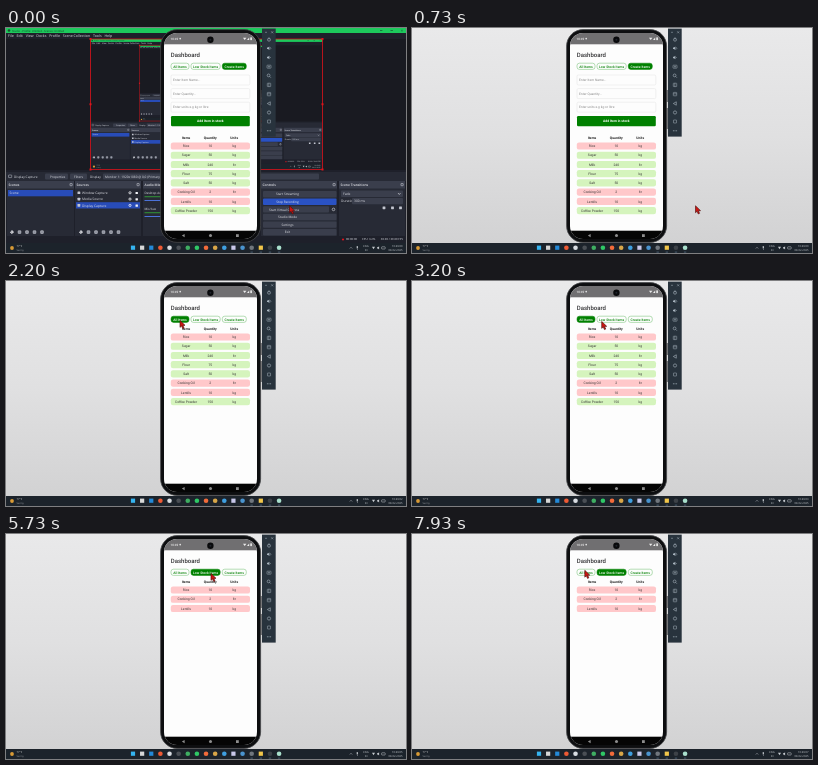
An HTML page with a canvas for the animation above (8000 ms loop, 400x225 px).

```html
<!DOCTYPE html>
<html lang="en">
<head>
<meta charset="utf-8">
<title>Stock dashboard</title>
<style>
html, body { margin: 0; width: 100%; height: 100%; overflow: hidden; background: #ddd; }
canvas { display: block; width: 100vw; height: 100vh; }
</style>
</head>
<body>
<canvas id="stage"></canvas>
<script>
const W = 400, H = 225, LOOP = 8000;
const canvas = document.getElementById('stage');
const ctx = canvas.getContext('2d');
const GREEN = '#008000', PINK = '#ffc8ca', LIME = '#d5f4bd';
const PREVIEW = { x: 84.5, y: 11, scale: 0.58 };

// Stock below 20 counts as low.
const items = [
  ['Rice', 10, 'kg'], ['Sugar', 50, 'kg'], ['Milk', 240, 'ltr'], ['Flour', 75, 'kg'],
  ['Salt', 50, 'kg'], ['Cooking Oil', 2, 'ltr'], ['Lentils', 10, 'kg'], ['Coffee Powder', 150, 'kg']
];
const isLow = item => item[1] < 20;

// Pointer tip: time, x, y
const path = [
  [0, 283.5, 177.8], [930, 283.5, 177.8], [1450, 174, 39.5], [2650, 174, 39.5],
  [3200, 189.7, 40.5], [4400, 205, 39.5], [6270, 205, 39.5], [6700, 233.3, 64.5],
  [7130, 233.3, 64.5], [7880, 172.8, 36.3], [8000, 172.8, 36.3]
];

function rect(x, y, w, h, color) {
  ctx.fillStyle = color;
  ctx.fillRect(x, y, w, h);
}

function paint(fill, stroke, line) {
  if (fill) { ctx.fillStyle = fill; ctx.fill(); }
  if (stroke) { ctx.strokeStyle = stroke; ctx.lineWidth = line; ctx.stroke(); }
}

function round(x, y, w, h, r, fill, stroke, line = 0.5) {
  ctx.beginPath();
  ctx.roundRect(x, y, w, h, r);
  paint(fill, stroke, line);
}

function dot(x, y, r, fill, stroke, line = 0.6) {
  ctx.beginPath();
  ctx.arc(x, y, r, 0, 7);
  paint(fill, stroke, line);
}

function poly(points, fill, stroke, line = 0.6, open = false) {
  ctx.beginPath();
  points.forEach(([x, y]) => ctx.lineTo(x, y));
  if (!open) ctx.closePath();
  paint(fill, stroke, line);
}

function text(s, x, y, size, color, align = 'left', weight = 400, family = 'Roboto, sans-serif') {
  ctx.font = `${weight} ${size}px ${family}`;
  ctx.textRendering = 'geometricPrecision';
  ctx.textAlign = align;
  ctx.textBaseline = 'alphabetic';
  ctx.fillStyle = color;
  ctx.fillText(s, x, y + size * 0.35);
}

const ui = (s, x, y, size = 3.3, color = '#dfe1e8', align = 'left', weight = 400) =>
  text(s, x, y, size, color, align, weight, '"Open Sans", sans-serif');

function wallpaper() {
  const g = ctx.createLinearGradient(0, 0, 0, 215);
  g.addColorStop(0, '#e9e9ea');
  g.addColorStop(0.5, '#e0e0e1');
  g.addColorStop(1, '#d2d2d3');
  rect(0, 0, W, H, g);
}

function dock(x, w, title) {
  rect(x, 153, w, 55, '#272a35');
  rect(x, 153, w, 7.5, '#3a3e4c');
  ui(title, x + 1.5, 157, 3.3, '#e6e7ec', 'left', 600);
  round(x + w - 4, 155.5, 2.2, 2.2, 0.3, null, '#dfe1e8');
}

function dockTools(x, n) {
  for (let i = 0; i < n; i++) {
    const cx = x + i * 7.5;
    if (i) round(cx - 1.4, 202.7, 2.8, 2.8, 0.4, '#8d909c', '#d3d6de', 0.5);
    else poly([[cx - 1.7, 204.1], [cx + 1.7, 204.1], [cx, 204.1], [cx, 202.4], [cx, 205.8]], null, '#e6e7ec', 0.8);
  }
}

function recorder(depth) {
  rect(0, 0, W, 215, '#1e202a');
  rect(0, 0, W, 5, '#1dc95c');
  dot(3, 2.5, 1.3, '#17532e');
  ui('Studio - Profile: Untitled - Scenes: Untitled', 6, 2.6, 2.7, '#12452a');
  [374, 384.5].forEach(x => rect(x, 2.4, 2.4, 0.6, '#12452a'));
  ui('×', 396, 2.5, 4, '#12452a', 'center');
  ui('File   Edit   View   Docks   Profile   Scene Collection   Tools   Help', 2, 8, 3.6);
  rect(0, 11, W, 131, '#191a21');

  const { x: px, y: py, scale } = PREVIEW, pw = W * scale, ph = H * scale;
  ctx.save();
  ctx.beginPath();
  ctx.rect(px, py, pw, ph);
  ctx.clip();
  ctx.translate(px, py);
  ctx.scale(scale, scale);
  if (depth > 0) screen(depth - 1, 'create', 0);
  else rect(0, 0, W, H, '#1e202a');
  ctx.restore();
  round(px, py, pw, ph, 0, null, '#e0141c', 0.8);
  for (const x of [0, pw])
    for (const y of [0, ph / 2, ph]) rect(px + x - 1, py + y - 1, 2, 2, '#e0141c');

  rect(0, 144, W, 9, '#272a35');
  round(2.5, 147, 3.2, 2.6, 0.4, null, '#c3c6d0');
  ui('Display Capture', 8, 148.6, 3.2);
  round(39, 145.5, 23, 6, 1, '#3a3e4c');
  ui('Properties', 44, 148.6, 3.2);
  round(64, 145.5, 17, 6, 1, '#3a3e4c');
  ui('Filters', 68, 148.6, 3.2);
  ui('Display', 84, 148.6, 3.2);
  round(97, 145.5, 216, 6, 1, '#3a3e4c');
  ui('Monitor 1: 1920x1080 @ 0,0 (Primary Monitor)', 99, 148.6, 3.2);

  dock(1, 67, 'Scenes');
  rect(2, 162, 65, 6.3, '#284cb8');
  ui('Scene', 3.5, 165.1);
  dockTools(6, 5);

  dock(69, 66, 'Sources');
  rect(70, 174.2, 64, 6.3, '#284cb8');
  ['Window Capture', 'Media Source', 'Display Capture'].forEach((s, i) => {
    const y = 164.8 + i * 6.3;
    round(71.5, y - 1.3, 2.8, 2.6, 0.4, '#c3c6d0');
    ui(s, 76, y);
    dot(124, y, 1.1, null, '#f3f4f8', 0.8);
    round(129.5, y - 0.9, 2.4, 2.2, 0.3, '#f3f4f8');
  });
  dockTools(75, 6);

  dock(137, 116, 'Audio Mixer');
  ['Desktop Audio', 'Mic/Aux'].forEach((s, i) => {
    const y = 165 + i * 16;
    ui(s, 138.5, y, 3.1);
    rect(138.5, y + 3, 70, 1.3, '#2f7d36');
    rect(208.5, y + 3, 25, 1.3, '#8b7b25');
    rect(233.5, y + 3, 19, 1.3, '#872f31');
    rect(138.5, y + 7, 112, 1, '#4b72d8');
  });

  dock(255, 76, 'Controls');
  ['Start Streaming', 'Stop Recording', 'Start Virtual Camera', 'Studio Mode', 'Settings', 'Exit']
    .forEach((s, i) => {
      const y = 166.2 + i * 7.6, camera = i === 2;
      round(257, y - 3.2, camera ? 66 : 73.5, 6.4, 1, i === 1 ? '#2a52c4' : '#3a3e4c');
      ui(s, camera ? 278 : 281.5, y, 3.2, '#e6e7ec', 'center');
      if (camera) dot(327.5, y, 1.3, null, '#dfe1e8');
    });

  dock(333, 66, 'Scene Transitions');
  round(335, 162.5, 62, 6.4, 1, '#3a3e4c');
  ui('Fade', 337, 165.8);
  poly([[392, 165], [393.3, 166.5], [394.6, 165]], null, '#dfe1e8', 0.6, true);
  ui('Duration', 335, 173);
  round(346, 170, 51, 6.2, 1, '#3a3e4c');
  ui('300 ms', 348, 173);
  [378, 386.5, 394.5].forEach(x => round(x - 1.4, 178.4, 2.8, 2.8, 0.4, '#c3c6d0'));

  rect(0, 208, W, 7, '#1e202a');
  dot(337, 211.5, 1.1, '#e0141c');
  ui('00:00:00', 340, 211.5, 2.8);
  ui('CPU: 3.2%', 356, 211.5, 2.8);
  ui('30.00 / 30.00 FPS', 397, 211.5, 2.8, '#dfe1e8', 'right');
}

function tab(label, x, w, active) {
  round(x, 35.2, w, 6.2, 2.4, active ? GREEN : '#fdfdfd', active ? GREEN : '#6cbc6c', 0.5);
  text(label, x + w / 2, 38.4, 3.4, active ? '#fff' : GREEN, 'center', 500);
}

function table(top, rows) {
  const cols = [180, 204.3, 228.3];
  ['Items', 'Quantity', 'Units'].forEach((s, i) => text(s, cols[i], top, 3.4, '#222', 'center', 700));
  rows.forEach((row, n) => {
    const y = top + 8 + n * 9.24;
    round(164.8, y - 3.6, 79.2, 7.2, 2.2, isLow(row) ? PINK : LIME);
    row.forEach((s, i) => text(String(s), cols[i], y, 3.35, '#333', 'center'));
  });
}

function createForm() {
  ['Enter Item Name...', 'Enter Quantity...', 'Enter units e.g kg or litre'].forEach((s, i) => {
    const y = 47 + i * 13.6;
    round(165, y, 78.8, 10, 1.2, '#fdfdfd', '#e2e2e2', 0.5);
    text(s, 167, y + 5.1, 3.3, '#888');
  });
  round(165, 88, 78.8, 10.2, 1.2, GREEN);
  text('Add Item in stock', 204.3, 93.2, 3.4, '#fff', 'center', 700);
}

function phone(page) {
  rect(254.4, 62, 1.2, 12, '#3a3a3c');
  rect(254.4, 80, 1.2, 21, '#3a3a3c');
  round(154.6, 1.6, 100, 212.8, 16.5, '#0d0e10', '#47484b', 0.8);
  ctx.save();
  ctx.beginPath();
  ctx.roundRect(158, 5, 93, 206, 13);
  ctx.clip();
  rect(158, 5, 93, 206, '#fdfdfd');
  rect(158, 5, 93, 11.3, '#706f71');
  rect(158, 202.7, 93, 9, '#050505');
  text('10:49', 164.5, 10.6, 3.1, '#eee', 'left', 500);
  dot(174.2, 10.6, 0.9, '#ddd');
  poly([[237, 9.7], [240.4, 9.7], [238.7, 12]], '#eee');
  poly([[241, 12], [243.2, 12], [243.2, 9.6]], '#eee');
  rect(244.3, 9.4, 1.6, 2.7, '#eee');
  poly([[178.6, 206], [178.6, 209.2], [175.8, 207.6]], '#8e8e8e');
  dot(204.5, 207.6, 1.5, '#8e8e8e');
  rect(230, 206.2, 2.8, 2.8, '#8e8e8e');
  ctx.restore();
  dot(204.4, 11.8, 3.2, '#08090b');
  dot(204.4, 11.8, 1, '#20242c');

  text('Dashboard', 164.8, 27.2, 6, '#333335', 'left', 500);
  tab('All Items', 165, 18, page === 'all');
  tab('Low Stock Items', 185, 29.2, page === 'low');
  tab('Create Items', 216.3, 24, page === 'create');
  if (page === 'create') createForm();
  table(page === 'create' ? 110 : 48, page === 'low' ? items.filter(isLow) : items);
}

function toolbar() {
  rect(256, 0.6, 13.7, 108, '#28333d');
  const c = '#a9b5bf', x = 263;
  const line = (...p) => poly(p, null, c, 0.5, true);
  line([259, 4.3], [261, 4.3]);
  line([265.2, 3.3], [267.2, 5.3]);
  line([267.2, 3.3], [265.2, 5.3]);
  dot(x, 11.7, 1.5, null, c);
  line([x, 9.4], [x, 11.5]);
  for (const [y, s] of [[20.3, 1], [29.5, 0]]) {
    poly([[x - 2, y - 0.7], [x - 1, y - 0.7], [x + 0.4, y - 1.8], [x + 0.4, y + 1.8], [x - 1, y + 0.7], [x - 2, y + 0.7]], c);
    line([x + 1.4, y - s], [x + 1.9, y], [x + 1.4, y + s]);
  }
  round(x - 2, 37.2, 4, 3, 0.5, null, c);
  dot(x, 38.7, 0.7, c);
  dot(x - 0.4, 47.4, 1.4, null, c);
  line([x + 0.6, 48.4], [x + 2, 49.8]);
  round(x - 1.7, 55.2, 3.4, 3.4, 0.4, null, c);
  line([x - 0.2, 55.2], [x - 0.2, 58.6]);
  round(x - 1.7, 64.4, 3.4, 3.4, 0.4, null, c);
  line([x - 1.7, 65.8], [x + 1.7, 65.8]);
  poly([[x + 1.3, 73.8], [x + 1.3, 77.2], [x - 1.7, 75.5]], null, c);
  dot(x, 84.5, 1.6, null, c);
  round(x - 1.5, 92, 3, 3, 0.2, null, c);
  [-1.6, 0, 1.6].forEach(d => dot(x + d, 102.7, 0.5, c));
}

function taskbar(t) {
  rect(0, 215, W, 10, '#1c232b');
  dot(6, 220, 1.9, '#d99a35');
  ui('77°F', 10.5, 218.5, 2.7, '#ccc');
  ui('Sunny', 10.5, 221.8, 2.5, '#999da3');

  const colors = ['#35b4f0', '#d8d8d8', '#2489d8', '#ee5a34', '#d9dde2', '#4a4f55', '#3fae62', '#2fc866',
    '#f26b3a', '#d8a648', '#3f9fe0', '#c9c8ea', '#4a94cf', '#70767d', '#f2c64a', '#3d4248', '#a9e0cd'];
  const squares = [0, 1, 2, 11, 14];
  colors.forEach((c, i) => {
    const x = 127 + i * 9.13;
    if (squares.includes(i)) rect(x - 2.1, 217.6, 4.2, 4.2, c);
    else dot(x, 219.7, 2.3, c);
    if (i > 12) rect(x - 1.2, 223.8, 2.4, 0.5, '#6d8fae');
  });

  const c = '#c9cdd2';
  poly([[343.8, 220.5], [345, 219.3], [346.2, 220.5]], null, c, 0.5, true);
  round(350.7, 217.9, 1.2, 2.6, 0.6, c);
  rect(351.1, 221, 0.4, 1, c);
  ui('ENG', 360, 218.4, 2.6, c, 'center');
  ui('IN', 360, 221.9, 2.6, c, 'center');
  poly([[366, 218.7], [369, 218.7], [367.5, 221.2]], c);
  poly([[371, 219.3], [372, 219.3], [373.1, 218.3], [373.1, 221.5], [372, 220.5], [371, 220.5]], c);
  round(375.6, 218.8, 3.6, 2.2, 0.5, null, c);
  const sec = String(Math.floor(t / 1000)).padStart(2, '0');
  ui('10:49:' + sec, 396.5, 218.4, 2.7, c, 'right');
  ui('08-02-2025', 396.5, 221.9, 2.7, c, 'right');
}

function screen(depth, page, t) {
  if (depth < 0) wallpaper();
  else recorder(depth);
  phone(page);
  toolbar();
  taskbar(t);
}

function pointer(t) {
  const i = Math.max(1, path.findIndex(p => p[0] > t));
  const [t0, x0, y0] = path[i - 1], [t1, x1, y1] = path[i];
  const k = (t - t0) / (t1 - t0), e = k * k * (3 - 2 * k);
  ctx.save();
  ctx.translate(x0 + (x1 - x0) * e, y0 + (y1 - y0) * e);
  ctx.scale(0.88, 0.88);
  ctx.lineJoin = 'round';
  poly([[0, 0], [0, 7.8], [1.8, 6.2], [3.1, 9.2], [4.6, 8.6], [3.3, 5.7], [5.7, 5.5]], '#cc1612', '#4a0c0c', 0.7);
  ctx.restore();
}

function frame(now) {
  const t = now % LOOP;
  const w = Math.round(innerWidth * devicePixelRatio), h = Math.round(innerHeight * devicePixelRatio);
  if (canvas.width !== w || canvas.height !== h) { canvas.width = w; canvas.height = h; }
  ctx.setTransform(w / W, 0, 0, h / H, 0, 0);
  const page = t < 2050 ? 'create' : t < 5550 ? 'all' : 'low';
  screen(t < 70 ? 2 : -1, page, t);
  pointer(t);
  requestAnimationFrame(() => frame(performance.now() - start));
}

const start = performance.now();
frame(0);
</script>
</body>
</html>
```
